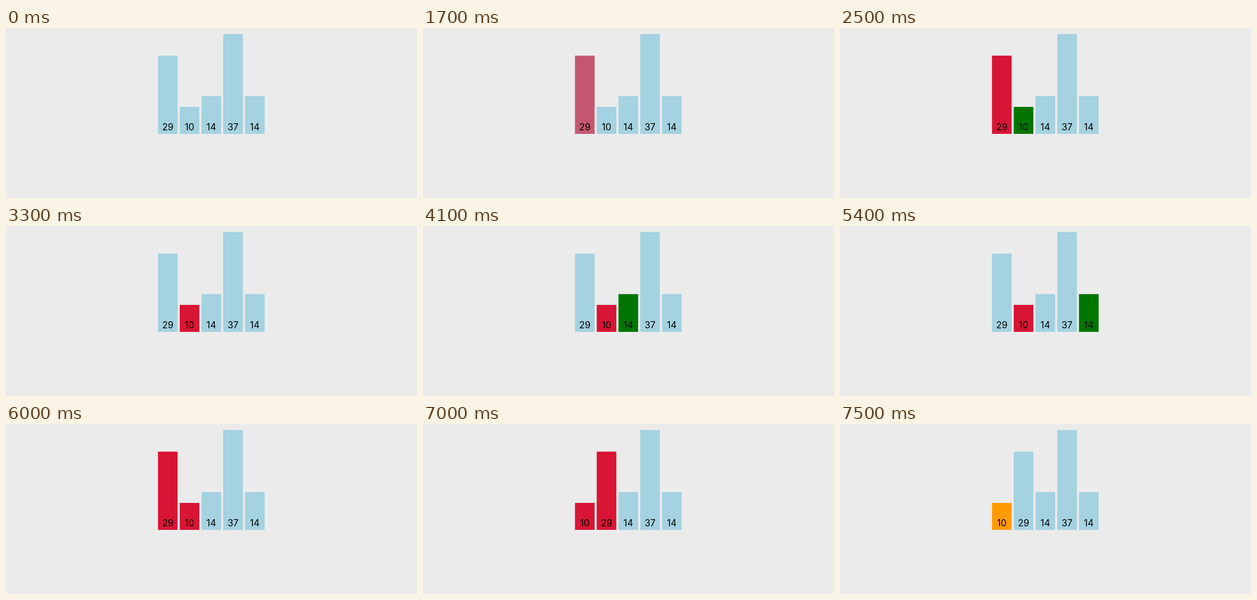
Animation, 804 px wide and 334 px high, one loop 8 s. Source, as an HTML page:

```html
<!DOCTYPE html>
<html lang="en">
<head>
<meta charset="utf-8">
<title>Selection sort</title>
<style>
  html, body { margin: 0; width: 100%; height: 100%; overflow: hidden; background: #ebebeb; }
  svg { display: block; width: 804px; height: 334px; }
  text { font: 18px Inter, "Liberation Sans", sans-serif; text-anchor: middle; }
</style>
</head>
<body>
<svg id="stage" viewBox="0 0 804 334"></svg>
<script>
const LOOP = 8000, TICK = 100, FIRST_STEP = 1700, STEP = 700;
const LEFT = 297.3, PITCH = 42.55, WIDTH = 38.4, FLOOR = 208, UNIT = 5.3;
const BLUE = [164, 210, 224], RED = [216, 21, 53], GREEN = [0, 117, 0], ORANGE = [255, 154, 0];

// Each sorting step recolours some bars; the swap exchanges the first two values.
const steps = [
  { colors: { 0: RED } },
  { colors: { 1: GREEN } },
  { colors: { 0: BLUE, 1: RED } },
  { colors: { 2: GREEN } },
  { colors: { 2: BLUE, 3: GREEN } },
  { colors: { 3: BLUE, 4: GREEN } },
  { colors: { 4: BLUE, 0: RED } },
  { colors: {}, swap: true },
  { colors: { 0: ORANGE, 1: BLUE } },
];

const states = [[29, 10, 14, 37, 14].map(value => ({ value, color: BLUE }))];
for (const { colors, swap } of steps) {
  const previous = states.at(-1);
  states.push(previous.map((bar, i) => ({
    value: swap && i < 2 ? previous[1 - i].value : bar.value,
    color: colors[i] || bar.color,
  })));
}

const stage = document.getElementById("stage");
function add(tag, attributes) {
  const node = document.createElementNS("http://www.w3.org/2000/svg", tag);
  for (const name in attributes) node.setAttribute(name, attributes[name]);
  return stage.appendChild(node);
}

const bars = states[0].map((_, i) => {
  const x = LEFT + i * PITCH;
  return {
    rect: add("rect", { x, width: WIDTH }),
    label: add("text", { x: x + WIDTH / 2, y: 201.3 }),
  };
});

const mix = (a, b, k) => a + (b - a) * k;

function draw(time) {
  const t = Math.floor(time % LOOP / TICK) * TICK;
  const index = Math.min(steps.length, Math.max(0, Math.floor((t - FIRST_STEP) / STEP) + 1));
  const sinceStep = t - FIRST_STEP - (index - 1) * STEP;
  const k = index && sinceStep < TICK ? 0.65 : 1;
  const from = states[Math.max(0, index - 1)], to = states[index];

  bars.forEach(({ rect, label }, i) => {
    const height = mix(from[i].value, to[i].value, k) * UNIT;
    const color = to[i].color.map((c, n) => Math.round(mix(from[i].color[n], c, k)));
    rect.setAttribute("y", FLOOR - height);
    rect.setAttribute("height", height);
    rect.setAttribute("fill", `rgb(${color})`);
    label.textContent = to[i].value;
  });
}

function frame() {
  draw(performance.now());
  requestAnimationFrame(frame);
}
frame();
</script>
</body>
</html>
```
